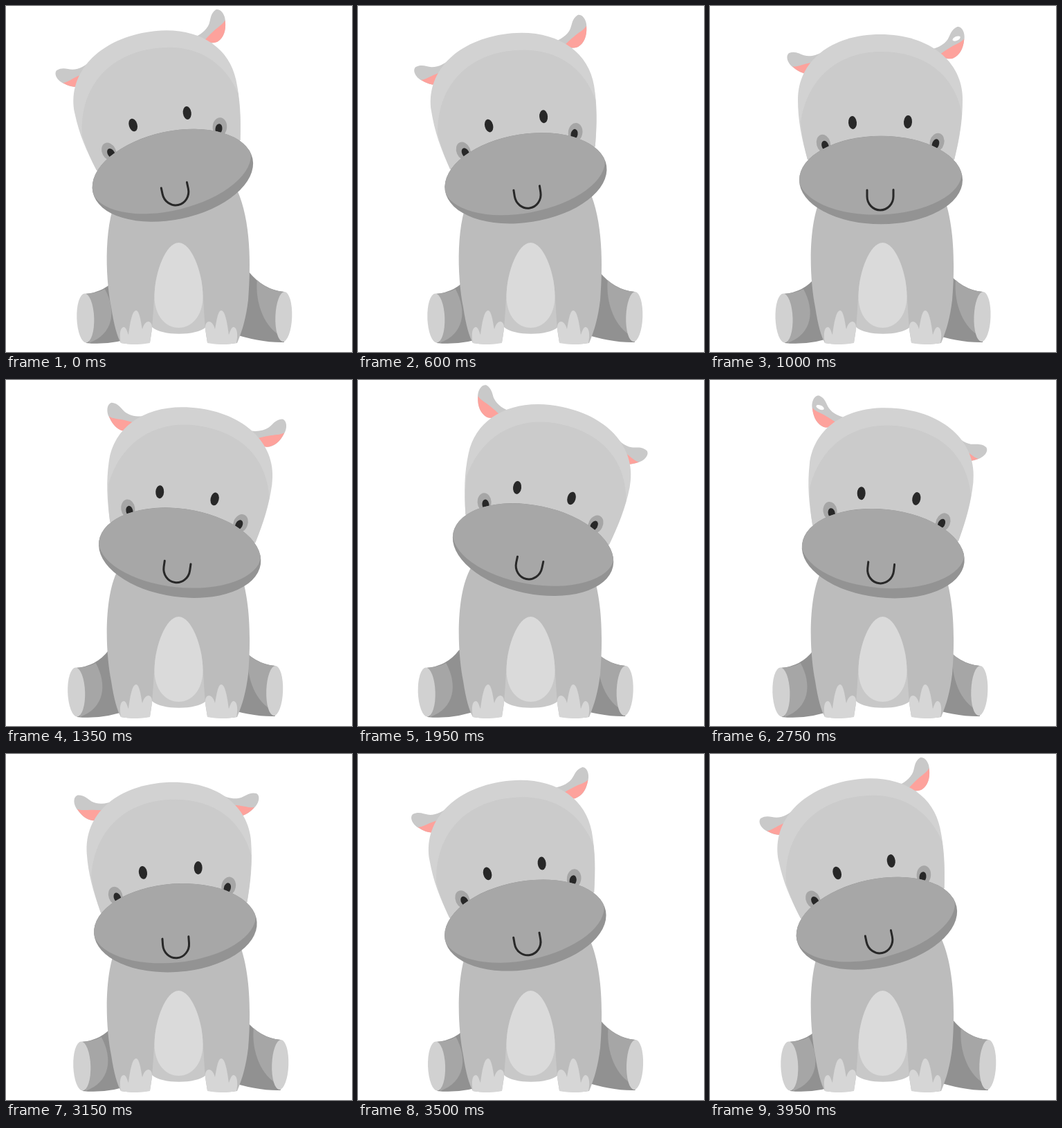
Animation of 500 by 500 pixels, one loop 4 s. Source, as an HTML page:

```html
<!DOCTYPE html>
<html lang="en">
<head>
<meta charset="utf-8">
<title>Swaying hippo</title>
<style>
html, body { margin: 0; width: 100%; height: 100%; overflow: hidden; background: #fff; }
svg { display: block; width: 100vw; height: 100vh; }
</style>
</head>
<body>
<svg viewBox="0 0 500 500">
  <defs>
    <g id="ear">
      <path fill="#c9c9c9" d="M173 62C160 66 148 65 140 60C134 56 130 49 120 49C113 51 113 63 119 71C126 83 135 88 144 88C154 86 158 78 185 85Z"/>
      <path fill="#fda29c" d="M118 69C124 72 133 71 140 72C148 73 155 74 161 76C155 82 150 88 144 88C134 88 125 82 118 69Z"/>
    </g>
    <path id="claws" fill="#d6d6d6" d="M166 487C164 478 164 465 170 464C174 464 175 471 177 475C179 460 182 440 188 440C193 440 195 457 197 467C199 460 202 456 206 456C212 457 212 467 210 473L208 487Q187 491 166 487Z"/>
    <ellipse id="muzzle" cx="247" cy="251.500" rx="118" ry="63.800"/>
    <clipPath id="inMuzzle"><use href="#muzzle"/></clipPath>
  </defs>

  <g id="feet">
    <path fill="#919191" d="M106 416Q136 414 154 390L185 400V476Q145 491 108 487Z"/>
    <path fill="#a6a6a6" d="M106 416Q124 415 135 409C152 440 148 474 112 487Z"/>
    <ellipse cx="107" cy="451" rx="12.500" ry="35.500" fill="#d1d1d1" transform="rotate(-2 107 451)"/>
    <path fill="#919191" d="M394 413Q364 410 343 384L315 400V472Q360 487 394 486Z"/>
    <path fill="#a6a6a6" d="M394 413Q370 411 355 396C352 430 366 466 392 478Z"/>
    <ellipse cx="393.500" cy="449" rx="12" ry="36" fill="#d1d1d1" transform="rotate(2 393.500 449)"/>
  </g>

  <path fill="#c8c8c8" d="M205 390H294L289 464C275 477 225 477 211 464Z"/>
  <path fill="#bcbcbc" d="M164 270C141 308 143 390 152 435C156 462 161 478 166 487Q188 491 208 486C214 455 212 425 217 395H282C287 425 285 455 291 486Q312 491 334 487C342 468 347 450 350 425C354 375 354 310 334 266Z"/>
  <path fill="#dadada" d="M249.500 342C268 342 284.500 385 284.500 420C284.500 448 268 465 249.500 465C231 465 214.500 448 214.500 420C214.500 385 231 342 249.500 342Z"/>
  <use href="#claws"/>
  <use href="#claws" transform="translate(499) scale(-1 1)"/>

  <g id="head">
    <g id="left"><use href="#ear"/><ellipse class="gap" cx="128" cy="64" rx="6" ry="3" fill="#fff"/></g>
    <g transform="translate(492.400) scale(-1 1)">
      <g id="right"><use href="#ear"/><ellipse class="gap" cx="128" cy="64" rx="6" ry="3" fill="#fff"/></g>
    </g>
    <path fill="#d2d2d2" d="M141 222C132 190 127 165 127 135C127 80 175 41 246 41C317 41 365 80 365 135C365 165 361 190 353 222Z"/>
    <path fill="#cbcbcb" d="M131 168C140 105 185 66 247 66C310 66 352 98 364 155C362 180 358 200 353 222H141C136 204 133 188 131 168Z"/>
    <g fill="#a6a6a6">
      <ellipse cx="164" cy="199" rx="10" ry="13.500" transform="rotate(-15 164 199)"/>
      <ellipse cx="328" cy="197" rx="10.300" ry="13.500" transform="rotate(15 328 197)"/>
    </g>
    <g fill="#282828">
      <ellipse cx="166.500" cy="202" rx="5" ry="7.500" transform="rotate(-20 166.500 202)"/>
      <ellipse cx="326" cy="199.500" rx="5" ry="7.500" transform="rotate(20 326 199.500)"/>
      <ellipse cx="206" cy="168.500" rx="6" ry="9.500" transform="rotate(-5 206 168.500)"/>
      <ellipse cx="286" cy="167.500" rx="6" ry="9.500" transform="rotate(4 286 167.500)"/>
    </g>
    <use href="#muzzle" fill="#939393"/>
    <g clip-path="url(#inMuzzle)">
      <ellipse cx="246" cy="244.500" rx="118" ry="57" fill="#a7a7a7" transform="rotate(-2 246 244.500)"/>
    </g>
    <path fill="none" stroke="#282828" stroke-width="3" stroke-linecap="round" d="M227 266V275A19 20 0 0 0 265 275V265.500"/>
  </g>
</svg>
<script>
const LOOP = 4000, STEP = 50;
const el = id => document.getElementById(id);
const move = (id, value) => el(id).setAttribute('transform', value);

// Sway from -1 to 1 and back, eased at both ends.
function sway(t) {
  const x = (t % 2000 - 1000) / 1000;
  const s = Math.sign(x) * (1 - (1 - Math.abs(x)) ** 2.65);
  return t < 2000 ? s : -s;
}

function ramp(t, from, to) {
  const u = Math.min(1, Math.max(0, (t - from) / (to - from)));
  return u * u * (3 - 2 * u);
}

function setEar(id, angle, showGap) {
  move(id, `rotate(${angle} 172 75)`);
  el(id).querySelector('.gap').style.display = showGap ? '' : 'none';
}

function draw(now) {
  const t = Math.floor(now % LOOP / STEP) * STEP;
  const s = sway(t);
  move('feet', `translate(${-7.8 * s})`);
  move('head', `translate(0 ${-7.2 * Math.abs(s) ** 3}) rotate(${11.9 * s} 246.2 281)`);
  // The ears trail behind the head.
  const left = ramp(t, 950, 1800) - ramp(t, 2550, 3700);
  const right = 1 - ramp(t, 1000, 2150) + ramp(t, 2780, 3850);
  setEar('left', -20 + 40 * left, t >= 2650 && t < 2900);
  setEar('right', -34 + 58 * right, t >= 900 && t < 1150);
}

const start = performance.now();
function tick() {
  draw(performance.now() - start);
  requestAnimationFrame(tick);
}
tick();
</script>
</body>
</html>
```
